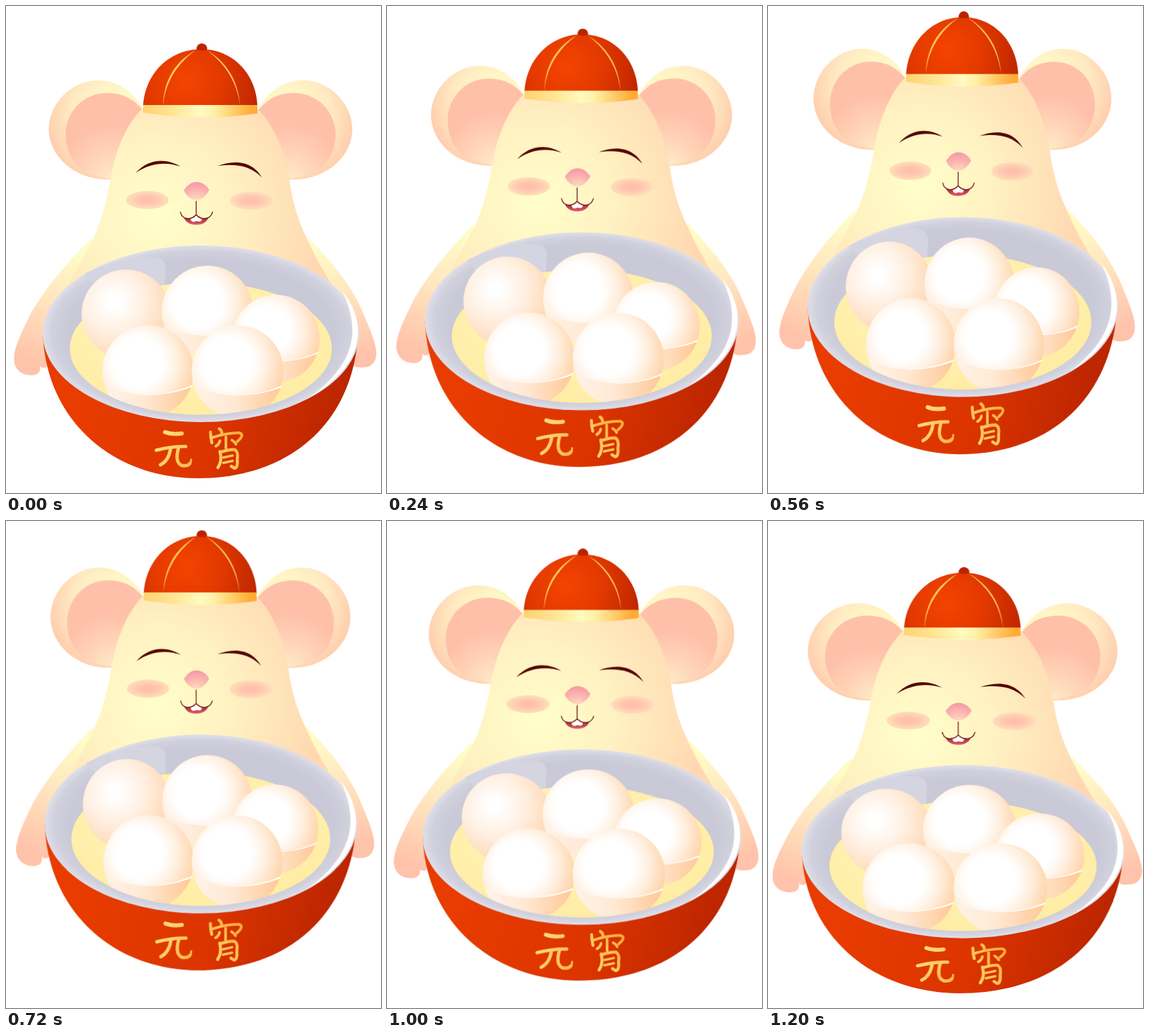
These frames come from a looping animation (561x728 px, 1.28 s). An HTML page:

```html
<!DOCTYPE html>
<html lang="zh">
<head>
<meta charset="utf-8">
<title>元宵</title>
<style>
  html, body { margin: 0; width: 100%; height: 100%; overflow: hidden; background: #fff; }
  svg { display: block; width: 561px; height: 728px; }
  #mouse { transform-origin: 283px 706px; animation: hop 1280ms infinite; }

  /* stretch on the way up, squash on the way down, in 40 ms ticks */
  @keyframes hop {
    0%      { transform: translateY(0) scale(1, 1); animation-timing-function: steps(6); }
    18.75%  { transform: translateY(-17px) scale(.992, 1.008); animation-timing-function: steps(4); }
    31.25%  { transform: translateY(-27px) scale(.9867, 1.0133); animation-timing-function: steps(4); }
    43.75%  { transform: translateY(-36px) scale(.9813, 1.0187); animation-timing-function: steps(1); }
    46.875% { transform: translateY(-39px) scale(.98, 1.02); animation-timing-function: steps(6); }
    65.625% { transform: translateY(-30px) scale(.996, 1.004); animation-timing-function: steps(4); }
    78.125% { transform: translateY(-19px) scale(1.0067, .9933); animation-timing-function: steps(5); }
    93.75%, 100% { transform: translateY(0) scale(1.02, .98); }
  }
</style>
</head>
<body>
<svg viewBox="0 0 561 728" role="img" aria-label="元宵">
  <defs>
    <radialGradient id="earOut" gradientUnits="userSpaceOnUse" cx="165" cy="165" r="115">
      <stop offset=".3" stop-color="#fff8c6"/><stop offset=".6" stop-color="#ffeac2"/><stop offset="1" stop-color="#ffc6a8"/>
    </radialGradient>
    <radialGradient id="earIn" gradientUnits="userSpaceOnUse" cx="160" cy="262" r="84">
      <stop offset=".1" stop-color="#ffe8c6"/><stop offset=".55" stop-color="#ffd2b6"/><stop offset="1" stop-color="#ffc0aa"/>
    </radialGradient>
    <radialGradient id="skin" gradientUnits="userSpaceOnUse" cx="225" cy="312" r="250">
      <stop offset="0" stop-color="#ffffca"/><stop offset=".45" stop-color="#fff2c2"/><stop offset="1" stop-color="#ffd8b2"/>
    </radialGradient>
    <linearGradient id="armL" gradientUnits="userSpaceOnUse" x1="115" y1="370" x2="35" y2="535">
      <stop offset="0" stop-color="#fffcc6"/><stop offset=".45" stop-color="#ffe6c0"/><stop offset="1" stop-color="#ffc2aa"/>
    </linearGradient>
    <linearGradient id="armR" gradientUnits="userSpaceOnUse" x1="462" y1="365" x2="545" y2="520">
      <stop offset="0" stop-color="#fffcc6"/><stop offset=".45" stop-color="#ffe6c0"/><stop offset="1" stop-color="#ffc2aa"/>
    </linearGradient>
    <radialGradient id="felt" gradientUnits="userSpaceOnUse" cx="268" cy="112" r="118">
      <stop offset="0" stop-color="#f44400"/><stop offset=".45" stop-color="#e43a00"/><stop offset="1" stop-color="#bb2500"/>
    </radialGradient>
    <linearGradient id="band">
      <stop offset="0" stop-color="#ffd272"/><stop offset=".25" stop-color="#ffe492"/><stop offset=".5" stop-color="#fffbc0"/>
      <stop offset=".62" stop-color="#fff0a6"/><stop offset=".95" stop-color="#ffab34"/>
    </linearGradient>
    <radialGradient id="blush">
      <stop offset="0" stop-color="#ffbcaa"/><stop offset=".5" stop-color="#ffc8b0"/><stop offset="1" stop-color="#ffdfba"/>
    </radialGradient>
    <radialGradient id="nose" cx=".5" cy=".95" r=".9">
      <stop offset="0" stop-color="#ffd8c0"/><stop offset=".5" stop-color="#fcb8b0"/><stop offset="1" stop-color="#f79aa8"/>
    </radialGradient>
    <linearGradient id="lips" x2="0" y2="1">
      <stop offset=".2" stop-color="#9c2230"/><stop offset="1" stop-color="#de5f6c"/>
    </linearGradient>
    <linearGradient id="clay" gradientUnits="userSpaceOnUse" x1="120" y1="570" x2="500" y2="670">
      <stop offset="0" stop-color="#e83c00"/><stop offset=".5" stop-color="#dc3500"/><stop offset="1" stop-color="#b92400"/>
    </linearGradient>
    <radialGradient id="glaze">
      <stop offset=".84" stop-color="#cac9d7"/><stop offset=".94" stop-color="#d1d1de"/><stop offset="1" stop-color="#dfdfe9"/>
    </radialGradient>
    <radialGradient id="soup" cx=".45" cy=".4" r=".6">
      <stop offset="0" stop-color="#fff6bc"/><stop offset="1" stop-color="#ffeda4"/>
    </radialGradient>
    <radialGradient id="dough" gradientUnits="userSpaceOnUse" cx="-15" cy="-13" r="88">
      <stop offset=".42" stop-color="#fff"/><stop offset=".65" stop-color="#fff1e2"/><stop offset="1" stop-color="#ffd2a6"/>
    </radialGradient>
    <radialGradient id="doughDim" gradientUnits="userSpaceOnUse" cx="-18" cy="-18" r="90">
      <stop offset=".1" stop-color="#fff"/><stop offset=".5" stop-color="#fff0e2"/><stop offset="1" stop-color="#ffd6b0"/>
    </radialGradient>
    <linearGradient id="under">
      <stop offset="0" stop-color="#fff3e8"/><stop offset=".45" stop-color="#ffe9d4"/><stop offset="1" stop-color="#ffc896"/>
    </linearGradient>
    <linearGradient id="gold1" gradientUnits="userSpaceOnUse" x1="222" y1="640" x2="280" y2="680">
      <stop offset="0" stop-color="#ffe282"/><stop offset="1" stop-color="#ffb94c"/>
    </linearGradient>
    <linearGradient id="gold2" gradientUnits="userSpaceOnUse" x1="303" y1="685" x2="356" y2="640">
      <stop offset="0" stop-color="#ffd872"/><stop offset="1" stop-color="#ffaa36"/>
    </linearGradient>
    <clipPath id="inSoup"><path d="M0 300H561V512H487.500A196 99 0 0 1 95.500 512H0Z"/></clipPath>
    <g id="ear">
      <path fill="url(#earOut)" d="M205 154C190 127 165 111 138 111C98 111 64 146 64 184C64 226 106 263 160 259L205 200Z"/>
      <path fill="url(#earIn)" d="M204 155C189 136 170 130 151 130C116 130 89 158 89 192C89 213 98 232 112 243C126 252 142 257 160 258L205 200Z"/>
    </g>
    <g id="shine">
      <path fill="url(#under)" d="M-64.500 22Q0 50 64.500 22A68 68 0 0 1 -64.500 22Z"/>
      <path fill="#fff" d="M-14 35.500Q30 37 65.500 21L64.500 24Q30 38 -14 35.500Z"/>
    </g>
    <g id="ball">
      <circle r="68" fill="url(#dough)"/>
      <use href="#shine"/>
    </g>
  </defs>

  <g id="mouse">
    <use href="#ear"/>
    <use href="#ear" transform="translate(582) scale(-1 1)"/>

    <path fill="url(#armL)" d="M128 347C92 383 55 425 34 466C21 492 12 512 12 527C12 544 24 552 38 552C47 552 52 548 51 538C54 542 59 542 62 537L140 470Z"/>
    <path fill="url(#armR)" d="M451 345C484 379 514 413 532 454C544 482 554 504 554 519C554 533 546 540 535 540C528 541 522 540 518 536L440 470Z"/>
    <path fill="url(#skin)" d="M204 153C176 181 162 224 156 260C149 304 136 342 118 372L84 432V520H496V432C478 400 466 382 455 358C440 328 430 302 424 260C418 224 406 184 376 153Z"/>

    <g id="hat">
      <path fill="#b92500" d="M285 67V64A8 8 0 0 1 301 64V67Z"/>
      <path fill="url(#felt)" d="M205 149C208 100 245 64.500 292 64.500C338 64.500 374 100 376 149Z"/>
      <path fill="#b92500" d="M285 64.500Q293 62 301 65Q293 68 285 64.500Z"/>
      <path fill="#ffc95c" d="M284 66C254 82 236 110 235 149C238 114 256 86 284 66ZM300 66C329 82 348 112 350 149C346 114 328 86 300 66Z"/>
      <path fill="url(#band)" d="M205 148H376V160.500Q292 173 205 159.500Z"/>
    </g>

    <g id="face">
      <path fill="#560606" d="M194 249.500C213 228 240 227 261 240C240 233 217 234 194 249.500ZM317 239C338 231 367 229 383 256.500C364 237 342 236 317 239Z"/>
      <ellipse cx="211.500" cy="290" rx="32" ry="13.500" fill="url(#blush)"/>
      <ellipse cx="367" cy="291" rx="32" ry="13.500" fill="url(#blush)"/>
      <path fill="url(#nose)" d="M266 275.500C271 268 277 263 285 263C293 263 300 268 304 275C301 282 293 290 285 290C277 290 269 283 266 275.500Z"/>
      <path fill="url(#lips)" d="M266 316C272 319 279 317 284.500 312C290 317 297 319 303 316C300 324 293 327 285 327C276 327 269 324 266 316Z"/>
      <path fill="#fff" d="M276 318Q281 317 284.500 313Q288 317 293 318Q293 324 285 321.500Q277 325 276 318Z"/>
      <path fill="none" stroke="#6a1814" stroke-width="1.300" stroke-linecap="round" d="M284.500 292V312M261 308C263 319 276 321 284.500 312C293 321 306 319 309 308"/>
    </g>

    <g id="bowl">
      <path fill="url(#clay)" d="M55 490C60 620 160 706 287 706C418 706 518 630 527 490Z"/>
      <ellipse cx="291.500" cy="490" rx="236.500" ry="132" fill="url(#glaze)"/>
      <path fill="#d5d4e1" d="M118 400Q162 379 212 375Q239 374 239 392L237 425H146Q130 416 118 400Z"/>
      <path fill="#fff" d="M503 426C537 468 546 532 450 588C522 538 532 486 503 426Z"/>
      <ellipse cx="291.500" cy="512" rx="196" ry="99" fill="url(#soup)"/>
      <g clip-path="url(#inSoup)">
        <circle r="66.500" fill="url(#doughDim)" transform="translate(179.500 460.500)"/>
        <use href="#ball" transform="translate(301.500 456.500) scale(1.005)"/>
        <use href="#ball" transform="translate(404 497) scale(.96)"/>
        <use href="#ball" transform="translate(212.500 545.500) scale(1.005)"/>
        <use href="#ball" transform="translate(346.500 546) scale(1.010)"/>
      </g>
    </g>

    <g id="brush" fill="none" stroke-linecap="round" stroke-linejoin="round">
      <g stroke="url(#gold1)">
        <path stroke-width="6" d="M238 637Q248 641 263 639"/>
        <path stroke-width="5" d="M225 664Q248 658 269 658.500M264 687Q272 688 275 684"/>
        <path stroke-width="5" d="M246 663Q243 680 231 686M258 661Q252 682 263 687"/>
        <path stroke-width="3" d="M275 685Q277 682 277 678"/>
      </g>
      <g stroke="url(#gold2)">
        <path stroke-width="4.500" d="M319 632Q323 634 323 640M306 637Q306 645 308 653"/>
        <path stroke-width="4" d="M309 645Q330 638 349 638Q358 641 346 651"/>
        <path stroke-width="4" d="M329 644L329 661M320 650Q319 655 314 658M338 649Q342 651 344 655"/>
        <path stroke-width="4.500" d="M320 666Q324 680 317 690M321 667Q332 663 342 663Q348 666 346 678Q347 690 342 691L337 688"/>
        <path stroke-width="3.500" d="M325 675L339 672M325 683L339 680"/>
      </g>
    </g>
  </g>
</svg>
</body>
</html>
```
